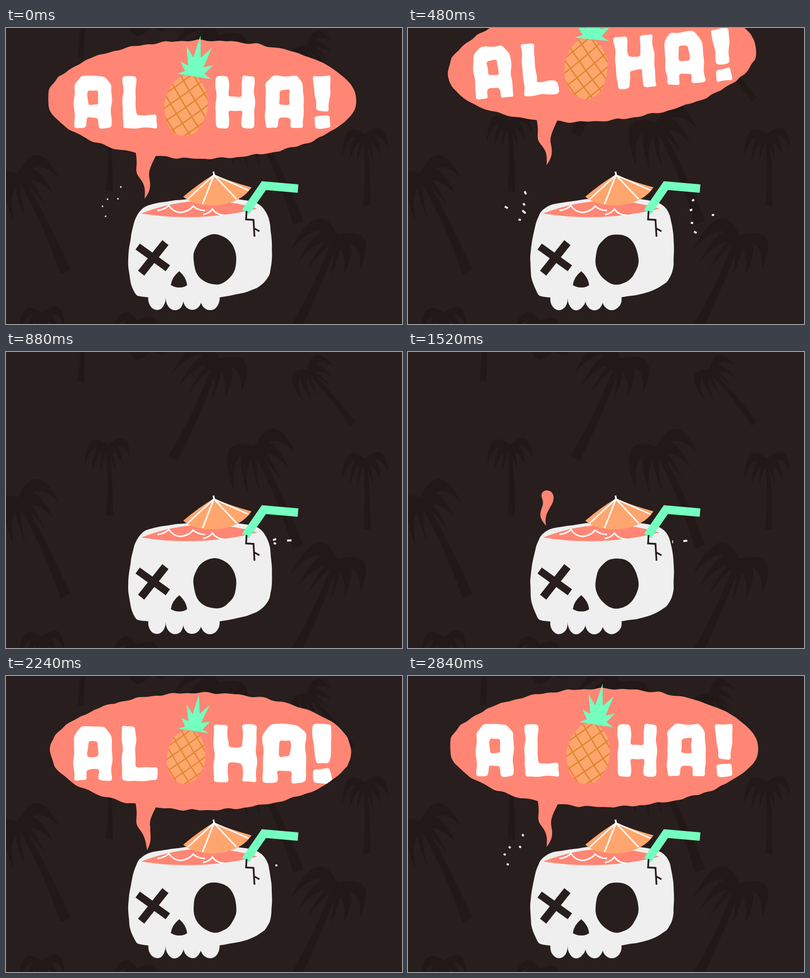
An HTML page with a canvas that plays this animation: 800 px wide and 600 px high, repeating every 2880 ms.

```html
<!DOCTYPE html>
<html lang="en">
<head>
<meta charset="utf-8">
<title>Aloha skull</title>
<style>
html, body { margin: 0; width: 100%; height: 100%; overflow: hidden; background: #281e1d; }
canvas { display: block; width: 100vw; height: 100vh; object-fit: contain; }
</style>
</head>
<body>
<canvas id="stage" width="800" height="600"></canvas>
<script>
const ctx = document.getElementById('stage').getContext('2d');
const LOOP = 2880, STEP = 40, CYCLE = LOOP / 2;
const DARK = '#281e1d', PALM = '#211817', BONE = '#efefef', CORAL = '#ff8674',
      MINT = '#74ffc0', ORANGE = '#ffa66e', GRID = '#e08733', WHITE = '#fff';

// Letter outlines in a unit box
const GLYPHS = {
  A: [[0,1, 0,.17, .2,0, .8,0, 1,.17, 1,1, .66,1, .66,.8, .33,.8, .33,1], [.37,.56, .37,.27, .64,.27, .64,.56]],
  L: [[0,0, .38,0, .38,.75, 1,.75, 1,1, 0,1]],
  H: [[0,0, .33,0, .33,.4, .67,.4, .67,0, 1,0, 1,1, .67,1, .67,.66, .33,.66, .33,1, 0,1]],
  '!': [[0,0, 1,0, .9,.67, .2,.67], [.1,.78, .9,.74, 1,1, .1,1]]
};
// Glyph, left edge, width, place in the pop-in order
const WORD = [['A', 138, 75, 0], ['L', 236, 69, 1], ['H', 424, 78, 3], ['A', 524, 77, 4], ['!', 620, 36, 5]];

// Crown position and tilt in degrees
const SMALL_PALMS = [[205,194,0], [612,40,-38], [725,222,0], [72,584,0], [264,599,15], [152,-78,2], [292,-8,170]];
const BIG_PALMS = [[28,303,-24], [425,22,26], [505,200,-22], [665,428,26]];

const LEFT = { x: 265, y: 400, from: 196, to: 247 };
const RIGHT = { x: 530, y: 385, from: -38, to: 30, reach: 62, spread: 25, peak: 2, lag: 60 };
const BURSTS = [
  { ...LEFT, start: 130, life: 560, reach: 58, spread: 22, peak: 1, lag: 5 },
  { ...LEFT, start: 930, life: 580, reach: 76, spread: 10, peak: 1.5, lag: 5 },
  { ...RIGHT, start: 0, life: 600 },
  { ...RIGHT, start: 760, life: 600 }
];

let boil = 0;

const noise = (x, y, s) => (Math.sin(x * .06 + y * .1 + s) + Math.sin(y * .17 - x * .11 + s * 2)) / 2;
const bump = (t, mid, width) => Math.exp(-(((t - mid) / width) ** 2));
const grow = (t, span) => 1 - Math.exp(-((t / span) ** 1.2));

function oval(cx, cy, rx, ry, n = 48) {
  const pts = [];
  for (let i = 0; i < n; i++) {
    const a = i / n * 2 * Math.PI;
    pts.push(cx + rx * Math.cos(a), cy + ry * Math.sin(a));
  }
  return pts;
}

// Closed smooth curve through a few key points
function spline(keys) {
  const n = keys.length, out = [];
  for (let i = 0; i < n; i += 2) {
    for (let u = 0; u < 1; u += .25) {
      for (const axis of [0, 1]) {
        const [a, b, c, d] = [-2, 0, 2, 4].map(k => keys[(i + k + n) % n + axis]);
        out.push(b + .5 * u * (c - a + u * (2 * a - 5 * b + 4 * c - d + u * (3 * (b - c) + d - a))));
      }
    }
  }
  return out;
}

// Adds a closed outline with a hand-cut wobble to the current path
function trace(pts, amp, s, soft = true) {
  const out = [], n = pts.length;
  for (let i = 0; i < n; i += 2) {
    const x = pts[i], y = pts[i + 1];
    const dx = pts[(i + 2) % n] - x, dy = pts[(i + 3) % n] - y;
    const cuts = soft ? Math.max(1, Math.round(Math.hypot(dx, dy) / 11)) : 1;
    for (let k = 0; k < cuts; k++) {
      const px = x + dx * k / cuts, py = y + dy * k / cuts;
      out.push([px + amp * noise(px, py, s), py + amp * noise(py, px, s + 2)]);
    }
  }
  const mid = (a, b) => [(a[0] + b[0]) / 2, (a[1] + b[1]) / 2];
  if (soft) {
    ctx.moveTo(...mid(out[out.length - 1], out[0]));
    out.forEach((p, i) => ctx.quadraticCurveTo(...p, ...mid(p, out[(i + 1) % out.length])));
  } else {
    out.forEach((p, i) => i ? ctx.lineTo(...p) : ctx.moveTo(...p));
  }
  ctx.closePath();
}

function shape(pts, color, amp = .7, s = boil, soft = true) {
  ctx.beginPath();
  trace(pts, amp, s, soft);
  ctx.fillStyle = color;
  ctx.fill();
}

function line(d, color, width) {
  ctx.strokeStyle = color;
  ctx.lineWidth = width;
  ctx.stroke(new Path2D(d));
}

function fillPath(d, color) {
  ctx.fillStyle = color;
  ctx.fill(new Path2D(d));
}

// Scales and leans around a fixed point
function pose(x, y, sx, sy = sx, lean = 0) {
  ctx.translate(x, y);
  ctx.transform(sx, 0, lean * sy, sy, 0, 0);
  ctx.translate(-x, -y);
}

function palm(x, y, tilt, size) {
  ctx.save();
  ctx.translate(x, y);
  ctx.rotate(tilt * Math.PI / 180);
  ctx.scale(size, size);
  fillPath('M-4 0 Q4 60 -3 137 L11 137 Q11 60 4 0Z', PALM);
  for (let k = -3; k <= 3; k++) {
    const ex = 15.3 * k, ey = 52 - 3 * k - 2.5 * k * k;
    const cx = ex * .95, cy = 12 - 5 * k * k;
    fillPath(`M0 -6 Q${cx} ${cy - 9} ${ex} ${ey} Q${cx * .7} ${cy + 14} 0 6Z`, PALM);
  }
  ctx.restore();
}

function burst({ x, y, from, to, start, life, reach, spread, peak, lag }, t) {
  ctx.fillStyle = BONE;
  for (let i = 0; i < 5; i++) {
    const delay = lag * Math.abs(i - peak);
    const p = ((t - start - delay + 2 * CYCLE) % CYCLE) / (life - delay);
    if (p <= 0 || p >= 1) continue;
    const far = reach + spread * Math.cos((i - peak) * 2.3);
    const len = Math.min(5 + i % 3 * 2, p * 60, (1 - p) * 24);
    const thick = Math.min(4, len);
    ctx.save();
    ctx.translate(x, y);
    ctx.rotate((from + (to - from) * i / 4) * Math.PI / 180);
    ctx.fillRect(far * (1 - (1 - p) ** 3) - len / 2, -thick / 2, len, thick);
    ctx.restore();
  }
}

function umbrella() {
  fillPath('M420 297 Q391 314 358 342 C385 365 442 364 471 346 Q486 338 496 323 Q452 311 420 297Z', ORANGE);
  for (const rib of ['367 347', '397 357', '466 347', '490 329']) line('M420 298 L' + rib, WHITE, 3);
  line('M419 291 L421 301', WHITE, 3.5);
}

function skull() {
  shape(spline([268,373, 325,352, 400,345, 470,347, 522,366, 537,440, 523,515, 432,546, 289,546, 258,532, 247,465]), BONE);
  for (let i = 0; i < 4; i++) shape(oval(305 + 35.7 * i, 548, 17.5 + .7 * i, 24), BONE);
  fillPath('M273 376 Q390 330 508 366 Q390 395 273 376Z', CORAL);
  line('M306 370 Q321 368 329 360 Q338 373 352 374 Q370 372 378 361 Q386 369 402 370', WHITE, 3);
  line('M398 378 Q411 376 417 367 Q424 378 442 380', WHITE, 3);
  umbrella();
  line('M484 373 L521 319.5 L590 325.5', MINT, 17);
  line('M486 371 L485 388 L500 389 L502 423 M501 406 L512 412', DARK, 3.5);
  line('M266 443 L327 487', DARK, 15);
  line('M322 435 L273 497', DARK, 16);
  shape(oval(422, 469, 43.5, 51), DARK);
  fillPath('M350 493 Q335 505 333 521 Q340 526 350 526 Q361 526 366 521 Q364 505 350 493Z', DARK);
}

// Spiky leaves fanned around the top of the fruit
function crown(s) {
  const pts = [];
  const put = (k, r) => {
    const a = (279 + 22 * k + .9 * k ** 3) * Math.PI / 180;
    pts.push(380 + r * Math.cos(a), 98 + r * Math.sin(a));
  };
  const reach = k => 34 + 50 * bump(k, .1, 1.5);
  for (let k = -3; k <= 3; k++) {
    put(k, reach(k));
    if (k < 3) put(k + .5, .6 * Math.min(reach(k), reach(k + 1)));
  }
  shape(pts, MINT, .8, s, false);
}

function pineapple(u, lean, s) {
  if (u <= 0) return;
  const size = 1 - Math.exp(-u / 165) * Math.cos(u * .0105) - .08 * bump(u, 560, 250);
  ctx.save();
  pose(364, 157, size, size, lean);
  ctx.save();
  ctx.translate(364, 157);
  ctx.rotate(.13);
  ctx.beginPath();
  trace(oval(0, 0, 43.5, 62), 1, s);
  ctx.fillStyle = ORANGE;
  ctx.fill();
  ctx.clip();
  for (const angle of [.9, -.75]) {
    ctx.save();
    ctx.rotate(angle);
    for (let y = -69; y <= 69; y += 23) line(`M-80 ${y} Q0 ${y + 5} 80 ${y}`, GRID, 2.8);
    ctx.restore();
  }
  ctx.restore();
  crown(s);
  ctx.restore();
}

function letter([glyph, x, w, order], t, lean, s) {
  const u = t - 1600 - 48 * order;
  if (u <= 0) return;
  const top = 97, h = 106;
  const size = (1 - Math.exp(-u / 50)) * (1 + .14 * bump(u, 380, 200));
  ctx.save();
  pose(x + w / 2, top + h / 2, size, size, lean);
  ctx.beginPath();
  for (const part of GLYPHS[glyph]) trace(part.map((v, i) => i % 2 ? top + v * h : x + v * w), 2, s);
  ctx.fillStyle = WHITE;
  ctx.fill('evenodd');
  ctx.restore();
}

function speech(t) {
  if (t <= 1400) return;
  if (t <= 1520) {
    ctx.save();
    pose(279, 352, (t - 1400) / 120);
    fillPath('M279 352 C269 341 264 332 270 317 C277 300 268 298 270 288 C273 277 292 278 294 293 C296 313 273 322 279 352Z', CORAL);
    ctx.restore();
    return;
  }

  // Slow drift upward, then an accelerating, tilting exit
  const e = Math.max(0, t - LOOP) / 480;
  const drift = t < LOOP ? Math.min(7, (LOOP - t) * .0125) : -5 * e - 63 * e ** 3;
  const tilt = .076 * e * e;
  const s = 2 * Math.PI * t / LOOP;
  const sway = 7 * bump(t, 2040, 350);

  ctx.save();
  ctx.translate(280, 345 + drift);
  ctx.transform(1, -tilt, tilt * .3, 1, 0, 0);
  ctx.translate(-280, -345);

  fillPath(`M262 252 C268 285 257 287 270 304 C280 317 282 326 ${280 + sway} 346 C297 325 290 312 ${289 + sway / 2} 299 C288 285 298 270 306 252Z`, CORAL);

  ctx.save();
  ctx.save();
  pose(283, 262, grow(t - 1520, 237), grow(t - 1520, 194));
  ctx.beginPath();
  trace(oval(396, 145, 312, 120), 2.5, s);
  ctx.restore();
  ctx.fillStyle = CORAL;
  ctx.fill();
  ctx.clip();
  for (const l of WORD) letter(l, t, tilt * .7, s);
  ctx.restore();
  pineapple(t - 1690, tilt * .7, s);
  ctx.restore();
}

function draw(t) {
  boil = t / STEP * 1.7;
  ctx.fillStyle = DARK;
  ctx.fillRect(0, 0, 800, 600);
  for (const p of SMALL_PALMS) palm(...p, 1);
  for (const p of BIG_PALMS) palm(...p, 1.55);
  for (const b of BURSTS) burst(b, t);
  skull();
  speech(t < 1200 ? t + LOOP : t);
}

function tick() {
  draw(Math.floor(performance.now() % LOOP / STEP) * STEP);
  requestAnimationFrame(tick);
}
tick();
</script>
</body>
</html>
```
